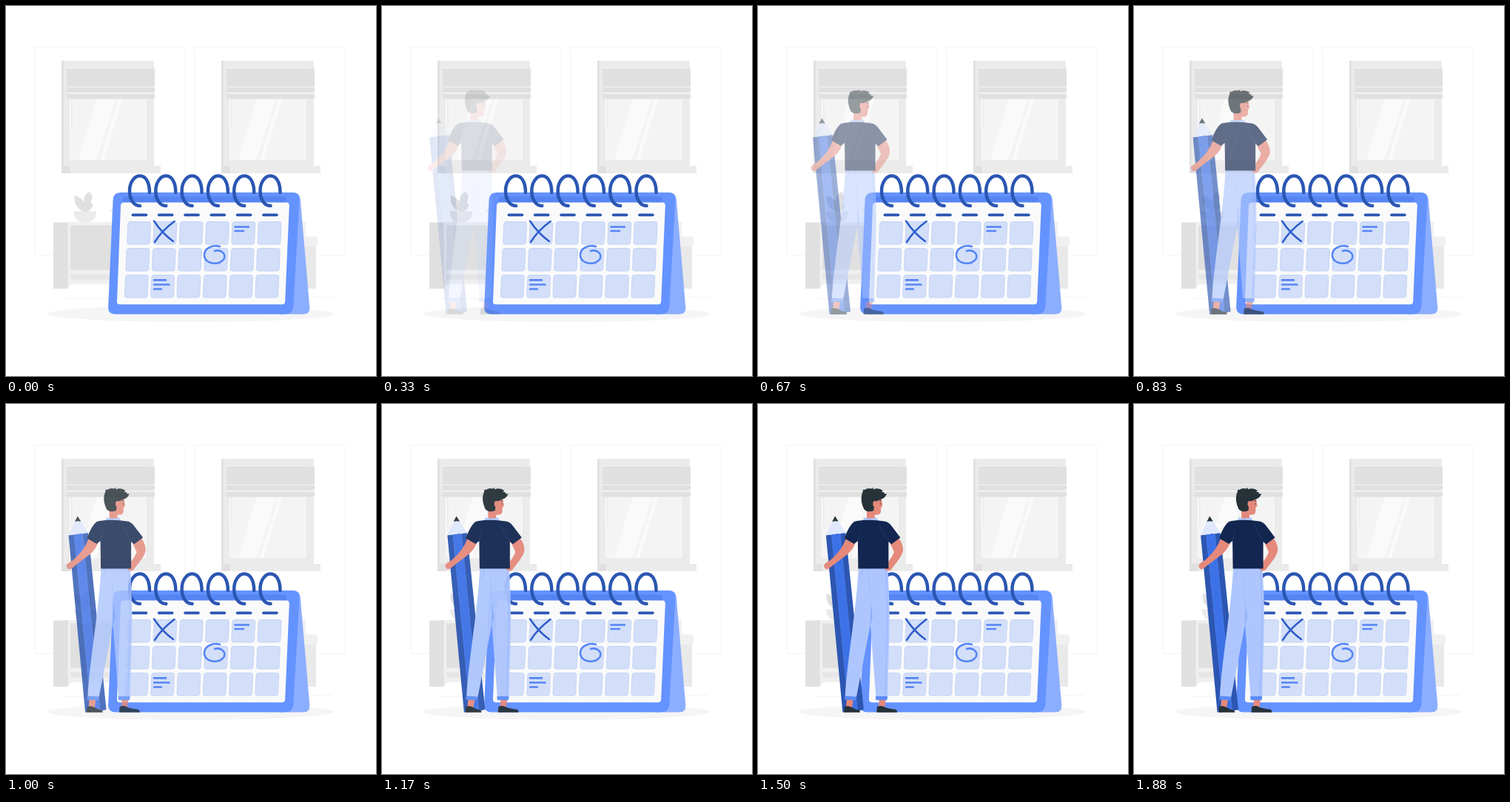
Animation of 500 by 500 pixels, one loop 1.93 s. Source, as an HTML page:

```html
<!DOCTYPE html>
<html lang="en">
<head>
<meta charset="utf-8">
<title>Planning calendar</title>
<style>
html, body { margin: 0; width: 100%; height: 100%; overflow: hidden; background: #fff; }
svg { display: block; width: 100%; height: 100%; }
</style>
</head>
<body>
<svg viewBox="0 0 500 500">
  <defs>
    <g id="window">
      <rect x="38.7" y="55.4" width="203.4" height="282" rx="2" fill="none" stroke="#f0f0f0" stroke-width=".7"/>
      <path fill="#ebebeb" d="M75 74H200V216H209V226H75Z"/>
      <path fill="#e0e0e0" d="M75 74H77.6V216H87V226H75Z"/>
      <path fill="#f0f0f0" d="M83 83H193V209H83Z"/>
      <path fill="#f4f4f4" d="M85 84H191V208.5H85Z"/>
      <path fill="#e2e2e2" d="M190.6 120H192V209H190.6ZM84 120H85V209H84Z"/>
      <path fill="#fafafa" d="M124 120 98 208H122L151 120ZM154 120 127 208H132L159 120Z"/>
      <path stroke="#e6e6e6" d="M89 125V165"/>
      <path fill="#f0f0f0" d="M83 84H200V126H83Z"/>
      <g fill="#e0e0e0">
        <rect x="82" y="84.5" width="119" height="24.3" rx="1"/>
        <rect x="82" y="110" width="119" height="6.5" rx="1"/>
        <rect x="82" y="119" width="119" height="6.6" rx="1"/>
      </g>
    </g>
    <path id="ring" d="M194 252C194 237 188 229.5 181 229.5C173 229.5 167 239 167 250C167 262 173 270 181 270"/>
    <path id="dash" d="M171.5 282.3H189.3"/>
    <rect id="cell" width="30.7" height="30.6" rx="3"/>
  </defs>

  <use href="#window"/>
  <use href="#window" x="216"/>
  <ellipse cx="249.5" cy="416" rx="194" ry="11" fill="#f5f5f5"/>
  <path stroke="#f0f0f0" stroke-width=".7" d="M80 395.5H140M412 393.5H428M431 393.5H440"/>

  <!-- cabinet and plants -->
  <path fill="#f0f0f0" d="M83 292H405V376H88L83 382Z"/>
  <path fill="#e0e0e0" d="M64 292.4H83.7V382H64ZM87 296.5H160V356.5H87Z"/>
  <path fill="#e6e6e6" d="M87 362.5H160V369.5H87Z"/>
  <path fill="#e9e9e9" d="M402 320H419V382H402Z"/>
  <rect x="385" y="311.5" width="36" height="13.5" rx="2" fill="#f0f0f0"/>
  <path fill="#e0e0e0" d="M104 278C96 273 91 266 93 256C99 258 103 261 105 265C105 258 108 253 113 251C117 256 118 260 114 265C119 267 118 274 110 278Z"/>
  <path fill="#ebebeb" d="M91.5 277.5H122C122 287 117 292.5 107 292.5C97 292.5 92 287 91.5 277.5Z"/>
  <path fill="#ebebeb" d="M141 274.5H154V283H146C143 281 141 278 141 274.5Z"/>

  <!-- calendar -->
  <path fill="#8caeff" d="M370 252H388Q396.8 252 397.8 261L410.3 407Q411 416.5 402 416.5H370Z"/>
  <path fill="#6492ff" d="M155 252H386Q397 252 396.5 263L388.3 406Q387.5 416.5 377 416.5H148Q137.5 416.5 138.2 406L144.6 262Q145 252 155 252Z"/>
  <path fill="#5585f2" d="M161 257.5H376Q379 258 379 265.5H158Q157 259 161 257.5Z"/>
  <path fill="#fafafa" d="M159 265.5H379Q383 265.5 382.8 270L377.2 399Q377 403.3 373 403.3H154Q149.7 403.3 150 399L155 270Q155.2 265.5 159 265.5Z"/>
  <g id="cells" fill="#d3dff9" stroke="#b7caf6" stroke-width=".7"></g>
  <g fill="none" stroke-linecap="round" stroke-linejoin="round">
    <g id="dashes" stroke="#2b56b3" stroke-width="3.8"></g>
    <g id="rings" stroke="#2b56b3" stroke-width="4.5"></g>
    <path stroke="#2f5fcb" stroke-width="2.6" d="M200 290.5C207 301 216 311 226 318M227.5 291C217 299 207 309 201 319"/>
    <path stroke="#5585f5" stroke-width="2.6" d="M289 325C278 322 267 328 268 338C270 350 290 351 295 341C297 333 289 329 282 331M309.5 298.5H328M309.5 304H321M200 370.4H216M200 376.5H220.5M200 382.5H210"/>
  </g>

  <g id="figure" opacity="0">
    <!-- pencil -->
    <path fill="#2c56b1" d="M90 177.5 116.5 174 141 413Q127 417 112.5 416.5Z"/>
    <path fill="#3d71e7" d="M97.5 176.5 109 175 132.5 414.5 121 416Z"/>
    <path fill="none" stroke="#5585f0" stroke-width=".6" d="M97.5 176.5 121 416M109 175 132.5 414.5"/>
    <path fill="#dfe8fd" d="M102 152 89.7 177.5Q93 175.500 97.500 176.500Q103 173.500 109 175.500Q113 173.500 117 174.500Z"/>
    <path fill="#263238" d="M102.200 151.500 98.300 159Q102 157.500 106.700 158.800Z"/>

    <!-- feet -->
    <path fill="#e5897b" d="M118 399H127L125 411H117ZM162 399H171L169 411H161Z"/>
    <path id="shoe" fill="#263238" d="M114.500 416.800 115 409Q119 407.500 124 409.500Q129 413 135 414Q136.500 415 136 416.800Z"/>
    <path fill="#263238" d="M158.500 416.800 159 409Q164 407 169 409.500Q175 412 184 412.800Q186.500 414 186 416.800Z"/>

    <!-- trousers -->
    <path fill="#aec6fd" d="M134 221H173.500C175 250 176.500 280 175.500 310L173 396.500H157.500L150 298L131 396.500H115.800C118 350 131 280 134 221Z"/>
    <path fill="#8dafff" d="M147.500 223Q149 265 153 287L149.500 303Q152 265 147 223Z"/>
    <path fill="none" stroke="#8dafff" stroke-width=".7" d="M170.500 222Q174 270 172 330L170 396M140 223Q139 232 134 236"/>
    <path fill="#5b8bf5" d="M115.500 394.500 131 395.500 130 400.500 114.800 399.500ZM157 395H173.200L172.500 400.300H157.500Z"/>

    <!-- arms and neck -->
    <path fill="#e5897b" d="M117 182 130 187Q127 196 119 203L98 219Q93 224 89.500 223Q86.500 220 87.500 217Q91 213.500 96 211Q112 197 117 182Z"/>
    <path fill="#e5897b" d="M176 187 188 181Q195 190 194 199C191 209 183 216 178 224Q174 227 170 224L171 217Q178 210 182 200Z"/>
    <path fill="#e5897b" d="M145 138H156V156H145Z"/>
    <path fill="#aec6fd" d="M139 158.500 141.500 153.500Q150 155.500 158.500 153.500L161 158.500Z"/>

    <!-- shirt -->
    <path fill="#12264f" d="M132 158Q150 155.500 169 158.500Q174 159 178 164L190.500 180.500 178.500 189.500 174.500 186V222.500H133.500L133 185 128 189 115 181.500Q121 164 128 159Z"/>
    <path fill="none" stroke="#2c4270" stroke-width=".6" d="M163 163Q166 176 177 188M133 186Q134 176 137 171"/>

    <!-- head -->
    <path fill="#e5897b" d="M153 126H164.500L166.500 138 164.500 139.500 164 146Q163 151 154 149.500L148 143Z"/>
    <path fill="#263238" d="M140 117.500Q139 115 142 116Q147 113 151 114.500L154 113 153.500 115.500Q161 112.500 167 117L165 118.500 169 119.500 168 121 172 121.500Q170 127 165 128.500Q160 131 155.500 132L154.500 144Q146 147 141.500 142.500Q136 131 138.500 122Z"/>
    <ellipse cx="156" cy="135" rx="2.600" ry="4" fill="#e5897b"/>
    <path fill="none" stroke="#263238" stroke-width=".8" d="M162 131.300 165 130.500M163.800 134V136"/>
  </g>
</svg>
<script>
const LOOP = 1930, STEP = 1000 / 24, LEAD = 45, START = 170, TRAVEL = 30;
const figure = document.getElementById('figure');

const fill = (id, html) => document.getElementById(id).innerHTML = html;
const repeat = (n, make) => Array.from({ length: n }, (_, i) => make(i)).join('');
const columns = id => repeat(6, i => `<use href="#${id}" x="${i * 35.3}"/>`);

fill('dashes', columns('dash'));
fill('rings', columns('ring'));
fill('cells', repeat(18, i => {
  const x = 164.9 + i % 6 * 35.3, y = 36 * Math.floor(i / 6);
  return `<use href="#cell" transform="translate(${x - y * .045} ${291.5 + y}) skewX(-2.6)"/>`;
}));

// cubic-bezier(.36, -.01, .5, 1.38), solved for x by bisection
const bezier = (a, b, s) => 3 * (1 - s) * (1 - s) * s * a + 3 * (1 - s) * s * s * b + s * s * s;
function ease(x) {
  let low = 0, high = 1;
  for (let i = 0; i < 24; i++) {
    const mid = (low + high) / 2;
    if (bezier(.36, .5, mid) < x) low = mid; else high = mid;
  }
  return bezier(-.01, 1.38, low);
}

function draw(now) {
  const t = now % LOOP;
  // motion advances at 24 steps per second
  const stepped = Math.floor((t + 5) / STEP) * STEP + LEAD;
  const p = ease(Math.min(1, stepped / LOOP));
  figure.setAttribute('opacity', t < START ? 0 : Math.max(0, Math.min(1, p)));
  figure.setAttribute('transform', `translate(${TRAVEL * (p - 1)} 0)`);
  requestAnimationFrame(draw);
}
requestAnimationFrame(draw);
</script>
</body>
</html>
```
